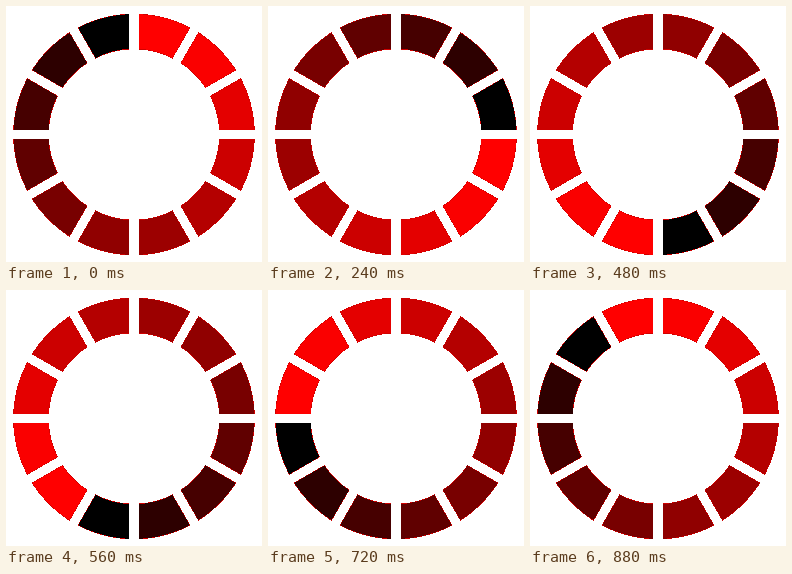
Animation of 256 by 256 pixels, one loop 960 ms. Source, as an HTML page:

```html
<!DOCTYPE html>
<html lang="en">
<head>
<meta charset="utf-8">
<title>Loading ring</title>
<style>
  html, body { margin: 0; width: 100%; height: 100%; overflow: hidden; background: #fff; }
  svg { display: block; width: 100vw; height: 100vh; shape-rendering: crispEdges; }
  circle { fill: none; }
  .rim { stroke: #d00000; stroke-width: 35.7; }
  .seg {
    stroke-width: 34.6;
    stroke-dasharray: 1 11;
    animation: fade 960ms step-end infinite;
  }
  .edge { stroke: #d00000; stroke-width: 9.96; }
  .gap { stroke: #fff; stroke-width: 9.1; }
  @keyframes fade {
    0% { stroke: #000000; }
    8.333% { stroke: #2d0000; }
    16.666% { stroke: #460000; }
    25% { stroke: #600000; }
    33.333% { stroke: #780000; }
    41.666% { stroke: #900000; }
    50% { stroke: #9c0000; }
    58.333% { stroke: #b40000; }
    66.666% { stroke: #cc0000; }
    75% { stroke: #e40000; }
    83.333% { stroke: #fa0000; }
    91.666%, 100% { stroke: #ff0000; }
  }
</style>
</head>
<body>
<svg viewBox="0 0 256 256">
  <g id="ring" transform="translate(128 128.5)"></g>
</svg>
<script>
  const COUNT = 12, STEP = 80, RADIUS = 103.05;
  const ring = document.getElementById('ring');

  function add(tag, attrs) {
    const el = document.createElementNS('http://www.w3.org/2000/svg', tag);
    for (const key in attrs) el.setAttribute(key, attrs[key]);
    ring.append(el);
    return el;
  }

  function addSpokes(cls, x1, x2) {
    for (let i = 0; i < COUNT; i++) {
      add('line', { class: cls, x1, x2, transform: `rotate(${i * 30})` });
    }
  }

  add('circle', { class: 'rim', r: RADIUS });

  // Each segment turns black one step after its neighbour.
  for (let i = 0; i < COUNT; i++) {
    const seg = add('circle', {
      class: 'seg', r: RADIUS, pathLength: COUNT,
      transform: `rotate(${i * 30 - 90})`
    });
    seg.style.animationDelay = `${(i + 1 - COUNT) * STEP}ms`;
  }

  // White spokes with a fine red edge cut the ring into parallel-sided gaps.
  addSpokes('edge', 86, 120);
  addSpokes('gap', 82, 124);
</script>
</body>
</html>
```
